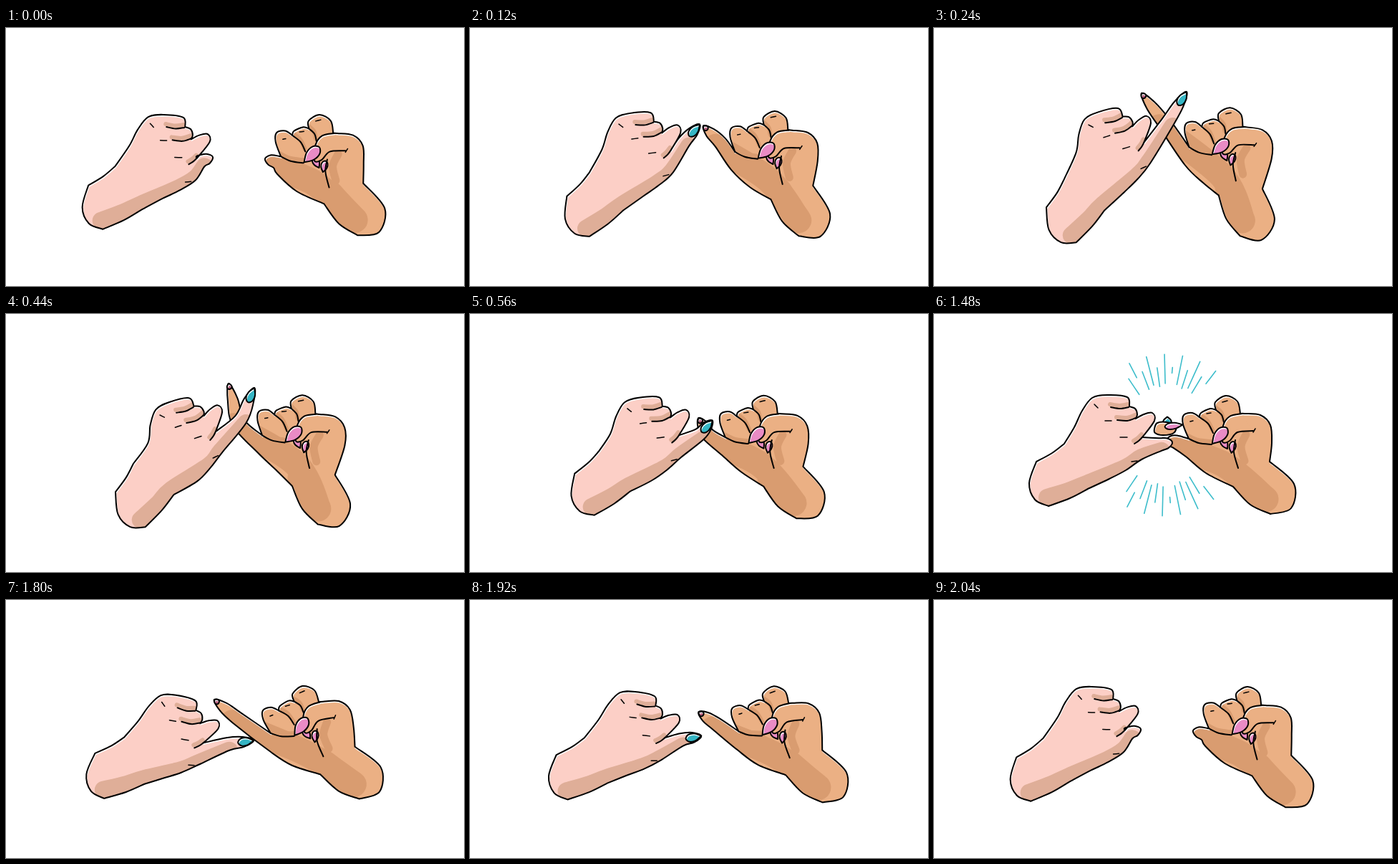
An HTML page with a canvas for the animation above (2480 ms loop, 640x360 px).

```html
<!DOCTYPE html>
<html lang="en">
<head>
<meta charset="utf-8">
<title>Pinky promise</title>
<style>
  html, body { margin: 0; width: 100%; height: 100%; overflow: hidden; background: #fff; }
  canvas { display: block; }
</style>
</head>
<body>
<canvas id="stage" width="640" height="360"></canvas>
<script>
const ctx = document.getElementById('stage').getContext('2d');
const LOOP = 2480, STEP = 40;
const PINK = '#e98bc5', TEAL = '#35b5c4', RAY = '#3dbdcb';

// Each hand is a forearm and a fist drawn once around a pivot, plus a jointed pinky.
// A pose is: forearm x, y, turn; fist x, y, turn; pinky joint x, y; pinky tip x, y.
// "!" marks a sharp corner, "|" separates strokes.
const left = {
  skin: '#fccfc6', dark: '#dfae98', side: 1, shadeWidth: 24,
  armPivot: [175, 225], fistPivot: [274, 137],
  armTop: '160,268! 141,259 133,236 143,206! 165,194 182,181!',
  fist: '196,158 207,135 221,117 242,113 270,116 273,129! 281,132 284,140 282,146! 293,140 305,138 308,149 291,172!',
  heel: '290,203 268,218 245,230',
  armBottom: '215,244! 190,257',
  armShade: '158,256 190,246 215,236',
  fistShade: '245,226 268,214 290,200',
  folds: '247,130 260,132 272,130|256,148 270,149 282,145|280,181 286,177 291,172',
  marks: '224,126 229,131|239,149 248,149|260,172 270,172|276,206 284,205',
  nail: [TEAL, 22, 5],
  poses: {
    fist:  [148, 237, -3, 251, 146, 2, 272, 186, 289, 180],
    cross: [194, 254, -25, 267, 131, -17, 326, 132, 353, 89],
    bend:  [190, 252, -25, 266, 136, -18, 328, 147, 347, 103],
    link:  [175, 225, 0, 274, 137, 0, 316, 182, 333, 179],
    part:  [155, 235, 4, 265, 162, 10, 310, 201, 346, 196]
  }
};

const right = {
  skin: '#ebb084', dark: '#d99c70', side: -1, shadeWidth: 36,
  armPivot: [465, 241], fistPivot: [407, 145],
  armTop: '470,279! 499,271 503,237 469,206!',
  fist: '472,180 470,155 456,141 434,139 428,139! 424,122 408,114 393,123 394,134! 386,132 373,138 371,144! 361,138 349,141 348,154 356,174!',
  heel: '352,199 380,222',
  armBottom: '418,241! 442,266',
  armShade: '425,226 445,243 462,257',
  fistShade: '352,193 385,202 405,210',
  folds: '394,134 402,141 405,151|371,144 383,153 390,166|356,174 370,180 388,182',
  marks: '403,123 410,121|381,139 387,138|358,150 362,149|446,165 449,160',
  nail: ['#b9607f', 8, 3],
  poses: {
    fist:  [491, 251, 7, 436, 152, 2, 378, 187, 362, 182],
    cross: [440, 254, 26, 410, 142, 5, 322, 133, 290, 91],
    bend:  [444, 256, 20, 411, 144, 4, 325, 152, 311, 97],
    link:  [465, 241, 0, 407, 145, 0, 337, 178, 325, 177],
    part:  [486, 240, -4, 417, 151, -7, 322, 164, 291, 139]
  },
  thumb: '430,139 413,143 404,156 403,178 413,177 424,165 446,163',
  palmLine: '421,176 419,193 425,215'
};

const hook = '308,160 312,152 325,151 338,156 335,166 320,169 309,166';

const keys = [
  [0, 'fist'], [240, 'cross'], [440, 'bend'], [640, 'link'],
  [1520, 'link'], [1800, 'part'], [1840, 'part'], [2040, 'fist'], [LOOP, 'fist']
];

const lerp = (a, b, k) => a + (b - a) * k;
const mid = (p, q, k = 0.5) => [lerp(p[0], q[0], k), lerp(p[1], q[1], k)];
const clamp = v => Math.max(0, Math.min(1, v));

const parse = text => text.split(' ').flatMap(p => {
  const q = p.split(',').map(v => parseFloat(v));
  return p.endsWith('!') ? [q, q] : [q];
});

function poseAt(hand, t) {
  const i = keys.findIndex(k => k[0] > t);
  const [t0, p0] = keys[i - 1], [t1, p1] = keys[i];
  const k = (t - t0) / (t1 - t0);
  return hand.poses[p0].map((v, j) => lerp(v, hand.poses[p1][j], k));
}

// Turns points about a pivot and moves the pivot to x, y.
function mover([px, py], x, y, degrees) {
  const c = Math.cos(degrees * Math.PI / 180), s = Math.sin(degrees * Math.PI / 180);
  return text => parse(text).map(([u, v]) =>
    [x + (u - px) * c - (v - py) * s, y + (u - px) * s + (v - py) * c]);
}

function beside(p, from, to, offset) {
  const dx = to[0] - from[0], dy = to[1] - from[1], len = Math.hypot(dx, dy);
  return [p[0] + dy / len * offset, p[1] - dx / len * offset];
}

function pinkyOutline(base, joint, tip, side) {
  const end = mid(joint, tip, 0.6);
  return [
    beside(joint, base, tip, 9 * side), beside(end, joint, tip, 7 * side), tip,
    beside(end, joint, tip, -7 * side), beside(joint, base, tip, -9 * side)
  ];
}

function nailPoints([x, y], angle, length, width) {
  const c = Math.cos(angle), s = Math.sin(angle);
  return parse('-0.5,0 -0.3,-1 0.1,-1 0.5,0! 0.1,1 -0.3,1').map(([u, v]) =>
    [x + u * length * c - v * width * s, y + u * length * s + v * width * c]);
}

// Smooth curve through the points; a doubled point makes a corner.
function curve(pts, closed) {
  const n = pts.length, path = new Path2D();
  const at = i => closed ? pts[(i + n) % n] : pts[Math.max(0, Math.min(n - 1, i))];
  path.moveTo(...pts[0]);
  for (let i = 0; i < n - !closed; i++) {
    const [a, b, c, d] = [at(i - 1), at(i), at(i + 1), at(i + 2)];
    if (b[0] === c[0] && b[1] === c[1]) continue;
    path.bezierCurveTo(b[0] + (c[0] - a[0]) / 6, b[1] + (c[1] - a[1]) / 6,
      c[0] - (d[0] - b[0]) / 6, c[1] - (d[1] - b[1]) / 6, ...c);
  }
  if (closed) path.closePath();
  return path;
}

function line(path, color = '#000', width = 2) {
  ctx.strokeStyle = color;
  ctx.lineWidth = width;
  ctx.stroke(path);
}

// Outlined shape with a light rim along its upper left edge.
function shape(pts, color, closed = true, shade) {
  const path = curve(pts, closed);
  ctx.save();
  ctx.clip(path);
  ctx.fillStyle = color;
  ctx.fill(path);
  if (shade) shade();
  ctx.translate(0.7, 1.7);
  line(path, '#fff', 1.6);
  ctx.restore();
  line(path);
}

function drawHand(hand, t, nailShown) {
  const p = poseAt(hand, t);
  const arm = mover(hand.armPivot, ...p.slice(0, 3));
  const fist = mover(hand.fistPivot, ...p.slice(3, 6));
  const joint = p.slice(6, 8), tip = p.slice(8);
  const knuckles = fist(hand.fist), heel = fist(hand.heel);
  const pinky = pinkyOutline(mid(knuckles.at(-1), heel[0]), joint, tip, hand.side);
  const folds = hand.folds.split('|').map(f => curve(fist(f)));

  shape([...arm(hand.armTop), ...knuckles, ...pinky, ...heel, ...arm(hand.armBottom)], hand.skin, true, () => {
    line(curve([...arm(hand.armShade), ...fist(hand.fistShade).slice(hand.side), pinky[4]]),
      hand.dark, hand.shadeWidth);
    ctx.save();
    ctx.translate(-1, -4);
    folds.forEach(f => line(f, hand.dark, 6));
    ctx.restore();
  });
  folds.forEach(f => line(f));
  hand.marks.split('|').forEach(m => line(curve(fist(m)), '#000', 1.5));

  if (hand.thumb) drawThumb(hand, fist, p[5]);
  if (nailShown) {
    const [color, length, width] = hand.nail;
    const angle = Math.atan2(tip[1] - joint[1], tip[0] - joint[0]);
    const center = [tip[0] - Math.cos(angle) * length / 2, tip[1] - Math.sin(angle) * length / 2];
    shape(nailPoints(center, angle, length, width), color);
  }
}

function drawThumb(hand, fist, turn) {
  const nail = (at, degrees, length, width) =>
    shape(nailPoints(fist(at)[0], (degrees + turn) * Math.PI / 180, length, width), PINK);
  nail('406,181', 60, 16, 4);
  nail('417,186', 100, 16, 4);
  line(curve(fist('436,168 429,185 434,205')), hand.dark, 11);
  shape(fist(hand.thumb), hand.skin, false);
  line(curve(fist(hand.palmLine)));
  nail('399,170', 133, 30, 7);
}

// A fan of rays, mirrored below the hands.
function drawRays(t) {
  const grow = clamp((t - 560) / 240), fade = clamp((t - 1440) / 200);
  if (!grow || fade === 1) return;
  for (let i = 0; i < 12; i++) {
    const angle = (-124 + 6.5 * i) * Math.PI / 180;
    const inner = i % 5 === 1 ? 80 : 57, full = i % 2 ? 108 : 90;
    const outer = lerp(inner, full, grow) + 24 * fade;
    const start = lerp(inner, full + 24, fade);
    for (const flip of [1, -1]) {
      const ray = r => [325 - (flip < 0 ? 3 : 0) + r * Math.cos(angle), 169 + flip * r * Math.sin(angle)];
      line(curve([ray(start), ray(outer)]), RAY, 1.6);
    }
  }
}

function draw(t) {
  const linked = t >= 600 && t < 1560;
  const nails = t > 80 && t < 1960 && !linked;
  ctx.fillStyle = '#fff';
  ctx.fillRect(0, 0, 640, 360);
  drawRays(t);
  drawHand(right, t, nails);
  drawHand(left, t, nails);
  if (linked) {
    shape(nailPoints([326, 149], -Math.PI / 2, 11, 5), TEAL);
    shape(parse(hook), right.skin);
    shape(nailPoints([335, 156], -0.12, 25, 4), PINK);
  }
}

ctx.lineCap = ctx.lineJoin = 'round';
const begin = performance.now();
function tick() {
  const t = (performance.now() - begin) % LOOP;
  draw(Math.floor(t / STEP) * STEP);
  requestAnimationFrame(tick);
}
tick();
</script>
</body>
</html>
```
